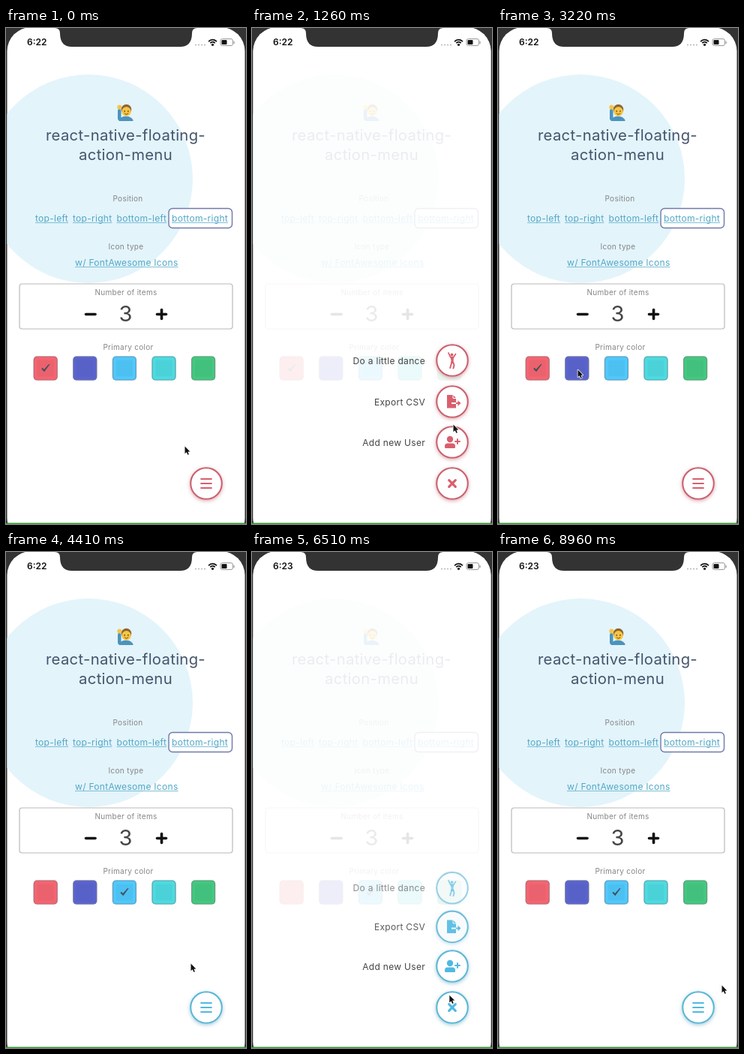
Animation of 320x661 px, one loop 9.03 s. Source, as an HTML page with a canvas:

```html
<!DOCTYPE html>
<html lang="en">
<head>
<meta charset="utf-8">
<title>Floating action menu</title>
<style>
html, body { margin: 0; width: 100%; height: 100%; overflow: hidden; background: #333; }
canvas { display: block; width: 320px; height: 661px; }
</style>
</head>
<body>
<canvas id="stage"></canvas>
<script>
const LOOP = 9030, STEP = 70, W = 320, H = 661;
const canvas = document.getElementById('stage');
const dpr = window.devicePixelRatio || 1;
canvas.width = W * dpr;
canvas.height = H * dpr;
const c = canvas.getContext('2d');

const SWATCHES = ['#f5646f', '#5a63cd', '#4fc8fb', '#4cdbe0', '#43c87f'];
const RED = { ring: '#c9616f', icon: '#d95f6d', fill: '#f5707d', glow: '190,80,95' };
const BLUE = { ring: '#5cb6d6', icon: '#4fb9e2', fill: '#4fc8fb', glow: '70,150,180' };
const ITEMS = [
  { y: 443, label: 'Do a little dance', icon: dancer },
  { y: 498, label: 'Export CSV', icon: exporter },
  { y: 552, label: 'Add new User', icon: addUser }
];
// time, x, y of the pointer tip
const POINTER = [
  [0, 238, 557], [330, 261, 604], [980, 263, 606], [1260, 268, 528],
  [1540, 269, 441], [1820, 268, 443], [2660, 205, 449], [3220, 106, 455],
  [3500, 155, 455], [3780, 157, 455], [4410, 246, 548], [5390, 247, 551],
  [5740, 260, 604], [6370, 261, 605], [6860, 270, 530], [7280, 272, 500],
  [7630, 271, 561], [8120, 271, 562], [8680, 297, 576], [8960, 298, 577],
  [9030, 298, 577]
];

const clamp = v => Math.max(0, Math.min(1, v));
const ease = v => v * v * (3 - 2 * v);
const ramp = (t, a, b) => ease(clamp((t - a) / (b - a)));
const pulse = (t, a, b, fade = 140) => ramp(t, a, a + fade) * (1 - ramp(t, b - fade, b));

function pointerAt(t) {
  let i = 0;
  while (i < POINTER.length - 2 && t >= POINTER[i + 1][0]) i++;
  const [ta, xa, ya] = POINTER[i], [tb, xb, yb] = POINTER[i + 1];
  const k = ramp(t, ta, tb);
  return [xa + (xb - xa) * k, ya + (yb - ya) * k];
}

function text(str, x, y, size, color, { align = 'center', weight = 400, space = 0.3 } = {}) {
  c.font = `${weight} ${size}px Inter, "Liberation Sans", sans-serif`;
  c.letterSpacing = space + 'px';
  c.textAlign = align;
  c.fillStyle = color;
  c.fillText(str, x, y);
}

function box(x, y, w, h, r, fill, stroke, width = 1) {
  c.beginPath();
  c.roundRect(x, y, w, h, r);
  if (fill) { c.fillStyle = fill; c.fill(); }
  if (stroke) { c.strokeStyle = stroke; c.lineWidth = width; c.stroke(); }
}

function disc(x, y, r, fill) {
  c.beginPath();
  c.arc(x, y, r, 0, 7);
  c.fillStyle = fill;
  c.fill();
}

function line(points, color, width, cap = 'round') {
  c.beginPath();
  points.forEach(([x, y], i) => i ? c.lineTo(x, y) : c.moveTo(x, y));
  c.strokeStyle = color;
  c.lineWidth = width;
  c.lineCap = cap;
  c.lineJoin = 'round';
  c.stroke();
}

function shape(points, fill) {
  c.beginPath();
  points.forEach(([x, y]) => c.lineTo(x, y));
  c.closePath();
  c.fillStyle = fill;
  c.fill();
}

function link(str, x, y) {
  text(str, x, y, 12.1, '#52a8c6', { align: 'left', space: 0.25 });
  c.fillStyle = '#7fbfd6';
  c.fillRect(x, y + 1, c.measureText(str).width, 1);
}

function emoji() {
  box(149, 108, 4.5, 15, 2, '#4c93bd');
  disc(151.3, 105.5, 3, '#f6c544');
  c.beginPath();
  c.ellipse(160, 124, 9.5, 6.5, 0, Math.PI, 0);
  c.fillStyle = '#4c93bd';
  c.fill();
  disc(160.5, 108.5, 6.8, '#8f6530');
  disc(160.5, 111.3, 6.2, '#f6c544');
  disc(158.2, 110.8, 0.9, '#5b3c1b');
  disc(162.9, 110.8, 0.9, '#5b3c1b');
  c.beginPath();
  c.arc(160.5, 112.6, 2.5, 0.3, 2.8);
  c.strokeStyle = '#7b4a1b';
  c.lineWidth = 1;
  c.stroke();
}

function swatch(x, color) {
  box(x, 437.5, 32, 32, 4.5, color);
  box(x + 5, 442.5, 22, 22, 2, 'rgba(60,70,110,.06)');
  box(x + 0.5, 438, 31, 31, 4.5, null, 'rgba(125,125,135,.65)', 1.2);
}

function page(chosen) {
  disc(110, 201, 139, '#e3f4fb');
  emoji();
  text('react-native-floating-', 159.5, 150, 20.3, '#46546c');
  text('action-menu', 159.5, 176, 20.3, '#46546c');

  const grey = '#858585';
  text('Position', 162.5, 231, 10, grey);
  link('top-left', 39, 258);
  link('top-right', 89, 258);
  link('bottom-left', 147.5, 258);
  box(217, 240.5, 84.5, 26, 5, '#fff', '#6f7aa8', 1.4);
  link('bottom-right', 221, 258);
  text('Icon type', 160, 295, 10, grey);
  link('w/ FontAwesome Icons', 92, 317);

  box(18, 341, 284, 60, 3.5, '#fff', '#b9b9b9', 1.2);
  text('Number of items', 160, 356, 10, grey);
  text('3', 159.5, 391, 29, '#444', { space: 0 });
  line([[106.5, 381.5], [119, 381.5]], '#111', 3.6);
  line([[201.5, 381.5], [213.5, 381.5]], '#111', 3.6);
  line([[207.5, 375.5], [207.5, 387.5]], '#111', 3.6);

  text('Primary color', 163, 429, 10, grey);
  SWATCHES.forEach((color, i) => {
    const x = 36.7 + i * 52.6;
    swatch(x, color);
    if (i === chosen) {
      const m = x + 16;
      shape([[m - 5.5, 454.2], [m - 4, 452.8], [m - 1.9, 455], [m + 4, 448.2], [m + 5.8, 448],
        [m - 1.6, 458.3]], '#41505c');
    }
  });
}

function dancer(color) {
  disc(-0.5, -7.5, 1.9, color);
  line([[-5, -10], [-2.5, -4.5], [1.5, -4], [4.5, -8.5]], color, 1.8);
  shape([[-2.8, -5], [2, -4.5], [1.6, 1], [2.4, 4], [-2, 4], [-1.5, 0]], color);
  line([[-0.8, 3], [-2.8, 10]], color, 2);
  line([[1.2, 3], [2.6, 6.5], [1.4, 10.5]], color, 2);
}

function exporter(color) {
  shape([[-7, -9], [1, -9], [5, -5], [5, 8.5], [-7, 8.5]], color);
  line([[1, -8.5], [1, -4.5], [5, -4.5]], '#fff', 1);
  line([[-1, 2], [5, 2]], '#fff', 2, 'butt');
  line([[5, 2], [9, 2]], color, 2, 'butt');
  shape([[7.5, -1.8], [11.5, 2], [7.5, 5.8]], color);
}

function addUser(color) {
  disc(-3, -4, 4.2, color);
  c.beginPath();
  c.roundRect(-10, 1.5, 14, 6.5, [4, 4, 1.5, 1.5]);
  c.fill();
  line([[4, -1], [10, -1]], color, 2);
  line([[7, -4], [7, 2]], color, 2);
}

function button(y, tone, press, icon) {
  c.save();
  c.translate(267, y);
  c.save();
  c.shadowColor = `rgba(${tone.glow},${0.5 * c.globalAlpha ** 3})`;
  c.shadowBlur = 5 * dpr;
  c.shadowOffsetY = 1.5 * dpr;
  disc(0, 0, 21.8, '#fff');
  c.restore();
  c.beginPath();
  c.arc(0, 0, 20.8, 0, 7);
  c.strokeStyle = tone.ring;
  c.lineWidth = 2.1;
  c.stroke();
  if (press > 0) {
    c.save();
    c.globalAlpha *= press;
    disc(0, 0, 18.3, tone.fill);
    c.restore();
  }
  icon();
  c.restore();
}

function menuIcon(color, k) {
  const alpha = c.globalAlpha;
  c.globalAlpha = alpha * (1 - k);
  for (const y of [-6, 0, 6]) line([[-6.8, y], [6.8, y]], color, 2.2);
  c.globalAlpha = alpha * k;
  c.rotate((k - 1) * Math.PI / 4);
  line([[-4.3, -4.3], [4.3, 4.3]], color, 3.2);
  line([[4.3, -4.3], [-4.3, 4.3]], color, 3.2);
  c.globalAlpha = alpha;
}

function pointer(x, y) {
  c.save();
  c.translate(x + 0.5, y + 0.5);
  c.scale(0.85, 0.85);
  const arrow = [[0, 0], [0, 11.5], [2.6, 9.2], [4.5, 13.3], [6.4, 12.5], [4.6, 8.5], [8, 8.2], [0, 0]];
  line(arrow, '#fff', 1.8);
  shape(arrow, '#111');
  c.restore();
}

function notch() {
  c.beginPath();
  c.moveTo(65, 0);
  c.quadraticCurveTo(72, 0, 72, 7);
  c.quadraticCurveTo(72, 25, 88, 25);
  c.lineTo(232, 25);
  c.quadraticCurveTo(248, 25, 248, 7);
  c.quadraticCurveTo(248, 0, 255, 0);
  c.fillStyle = '#333';
  c.fill();
}

function statusBar(clock) {
  notch();
  text(clock, 28, 23, 12, '#111', { align: 'left', weight: 600, space: 0 });
  for (let i = 0; i < 4; i++) disc(253 + i * 4, 22.5, 1.1, '#bbb');
  c.strokeStyle = '#111';
  c.lineWidth = 1.8;
  c.lineCap = 'butt';
  for (const r of [4.3, 7.3]) {
    c.beginPath();
    c.arc(275.5, 23, r, -2.4, -0.74);
    c.stroke();
  }
  disc(275.5, 22.3, 1.6, '#111');
  box(286, 14.5, 16.5, 9, 2.5, null, '#999', 1);
  box(287.5, 16, 7, 6, 1, '#111');
  box(303.5, 17.5, 1.2, 3.5, 0.6, '#999');
}

function draw(t) {
  const blue = t >= 3640;
  const tone = blue ? BLUE : RED;
  const second = t >= 4550;
  const [fadeIn, itemsIn, out] = second ? [5670, 6230, 8260] : [400, 840, 1820];
  const closed = ramp(t, out, out + 560);
  const open = ramp(t, fadeIn, fadeIn + 520) * (1 - closed);

  c.setTransform(dpr, 0, 0, dpr, 0, 0);
  c.fillStyle = '#333';
  c.fillRect(0, 0, W, H);
  c.save();
  box(1.5, -1, 317, 686, 32, '#fff');
  c.clip();
  page(blue ? 2 : 0);
  c.fillStyle = `rgba(255,255,255,${0.89 * open})`;
  c.fillRect(0, 0, W, H);

  ITEMS.forEach((item, i) => {
    const start = itemsIn + (2 - i) * 60;
    const show = ramp(t, start, start + 280) * (1 - ramp(t, out, out + 280));
    if (show <= 0) return;
    const y = item.y + 12 * (1 - show);
    const press = i === 2 ? pulse(t, 7560, 8120) : 0;
    c.globalAlpha = show;
    text(item.label, 231, y + 4.5, 12, '#444', { align: 'right' });
    button(y, tone, press, () => item.icon(press > 0.5 ? '#fff' : tone.icon));
    c.globalAlpha = 1;
  });

  const press = 0.8 * (second ? pulse(t, 5670, 6230) : pulse(t, 380, 840));
  button(607, tone, press, () => menuIcon(tone.icon, open));
  c.restore();

  statusBar(t < 5460 ? '6:22' : '6:23');
  c.fillStyle = '#3a9a3a';
  c.fillRect(0, 659.5, W, 1.5);

  const [x, y] = pointerAt(t);
  const touch = pulse(t, 7560, 8050);
  if (touch > 0) {
    c.beginPath();
    c.arc(x, y + 2, 16.5, 0, 7);
    c.strokeStyle = `rgba(20,20,20,${touch})`;
    c.lineWidth = 1.2;
    c.stroke();
  }
  pointer(x, y);
}

const begin = performance.now();
function tick(now) {
  const t = Math.max(0, now - begin) % LOOP;
  draw(Math.floor(t / STEP) * STEP);
  requestAnimationFrame(tick);
}
draw(0);
requestAnimationFrame(tick);
</script>
</body>
</html>
```
